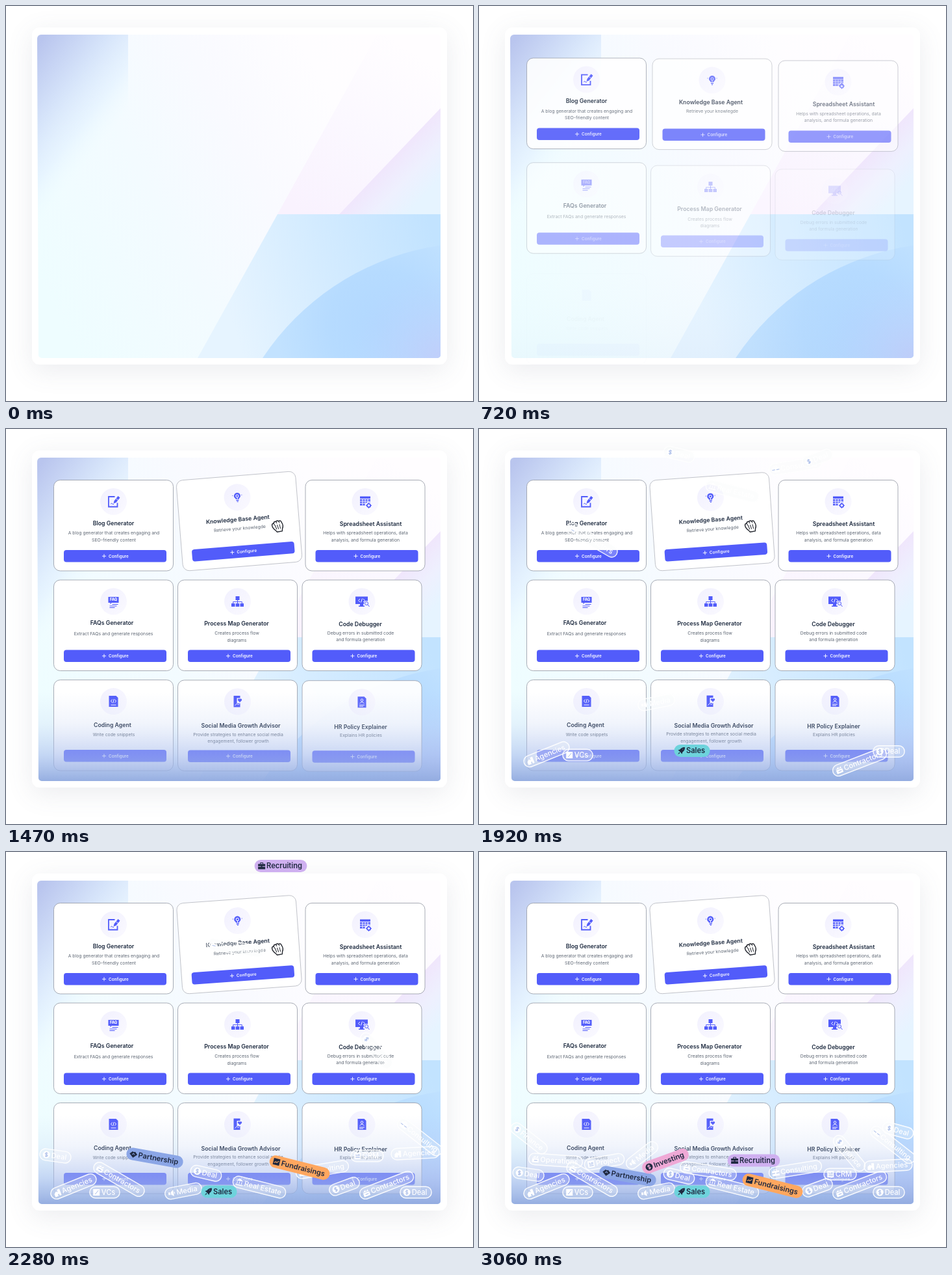
These frames come from a looping animation (719x607 px, 3.3 s). An HTML page with a canvas:

```html
<!DOCTYPE html>
<html lang="en">
<head>
<meta charset="utf-8">
<title>Agent gallery</title>
<style>
html, body { margin: 0; width: 100%; height: 100%; overflow: hidden; background: #fff; }
canvas { display: block; width: 719px; height: 607px; }
</style>
</head>
<body>
<canvas id="stage"></canvas>
<script>
const W = 719, H = 607, LOOP = 3300, STEP = 30;
const BLUE = '#525cfa', INK = '#1d2a3f', GREY = '#5c6572';
const FONT = 'Inter, "Open Sans", sans-serif';
const canvas = document.getElementById('stage');
const g = canvas.getContext('2d');
const dpr = window.devicePixelRatio || 1;
canvas.width = W * dpr;
canvas.height = H * dpr;

const clamp = v => Math.max(0, Math.min(1, v));
const rad = deg => deg * Math.PI / 180;

// Icon layers: f fill, s stroke, t thin stroke, F and T the same in the knock-out colour.
const ICONS = {
  edit: ['s M2 -7.5H-7.5V8H6V2', 'f M0 3L1 -1L7 -8.5L10 -6L4 1.5Z', 'T M4 -4.5L7 -2', 't M-4.500 4q2 -3 3 0h2'],
  bulb: ['f M-5 -2a5 5 0 1 1 10 0c0 3 -2.500 3 -2.500 5h-5c0 -2 -2.500 -2 -2.500 -5z', 'f M-2 4h4v1.500h-4zM-1 6.200h2v1.200h-2z',
    'T M-2 -2a2 2 0 1 1 4 0a2 2 0 1 1 -4 0M0 0v3', 't M-7.500 -3h1M6.500 -3h1'],
  table: ['f M-8 -8H8V6H-8Z', 'T M-8 -4H8M-8 -.5H8M-8 2.700H8M-4 -4V6M0 -4V6M4 -4V6', 'F M0 6a5.500 5.500 0 1 1 11 0a5.500 5.500 0 1 1 -11 0',
    's M2.800 6a2.700 2.700 0 1 1 5.400 0a2.700 2.700 0 1 1 -5.400 0', 't M5.500 1.500v1.500M5.500 9v1.500M1 6h1.500M8.500 6h1.500'],
  faq: ['f M-8 -7H8V2H-3L-5 4.500V2H-8Z', 't M-2 4.500H7M-6 7H5M-6 9.500H2'],
  tree: ['f M-3 -8H3V-2H-3ZM-9.500 3H-4V8H-9.500ZM-2.800 3H2.800V8H-2.800ZM4 3H9.500V8H4Z', 't M0 -2V3M-6.800 3V.5H6.800V3'],
  screen: ['f M-10 -7.500H9V4H-10ZM-3 4H2V6.500H-3ZM-5 6.500H4V8H-5Z', 'T M-3 -4L-5.500 -1.500L-3 1M2 -4L4.500 -1.500L2 1M.5 -4.500L-1.500 1.500',
    'F M3 3a4 4 0 1 1 8 0a4 4 0 1 1 -8 0', 't M4.500 3a2.500 2.500 0 1 1 5 0a2.500 2.500 0 1 1 -5 0M9 5L11.500 8'],
  code: ['f M-7 -8.500H4L7 -5.500V8.500H-7Z', 'T M-2 -3L-4 -.5L-2 2M2 -3L4 -.5L2 2M.6 -3.500L-.6 2.500M-4 5.500H4'],
  phone: ['f M-6 -9H4V8.500H-6Z', 'F M-1 -5.500H7V2.500H-1Z', 'f M3.500 1L.5 -2a1.600 1.600 0 0 1 3 -1.600a1.600 1.600 0 0 1 3 1.600Z', 'T M-4 6L-1 3L1 5L3 3'],
  person: ['f M-6.500 -8.500H3.500L6.500 -5.500V8.500H-6.500Z', 'T M-1.800 -3a1.800 1.800 0 1 1 3.600 0a1.800 1.800 0 1 1 -3.600 0M-3.500 2q3.500 -4 7 0M-4 4.500H4M-4 6.500H2'],
  coin: ['f M-5.500 0a5.500 5.500 0 1 1 11 0a5.500 5.500 0 1 1 -11 0', 'T M2 -2Q-2 -3.500 -2 -1.200Q-1.500 0 0 0Q2 .3 2 1.500Q1 3.200 -2 2M0 -4V4'],
  homes: ['f M-5 5V0L-1.500 -3L1 -1V-5H5V5H2V2H0V5Z'],
  slash: ['f M-5 -5H5V5H-5Z', 'T M-2 3L3 -3'],
  tool: ['f M-5 -1H5V5H-5ZM-5 -2L0 -5V-2L4 -5V-2Z', 'T M-2 2H3'],
  horn: ['f M-5 -2H-2V2H-5ZM-1 -2L3 -5V5L-1 2Z', 't M4.500 -1.500V1.500'],
  bank: ['f M-5.500 -2L0 -5.500L5.500 -2ZM-5.500 3.500H5.500V5H-5.500Z', 't M-3.500 -1V3M0 -1V3M3.500 -1V3'],
  gem: ['f M-6 0L-2 -4L0 -3L2 -4L6 0L0 5.500Z', 'T M-2 1L0 -1L2 1'],
  rocket: ['f M5.500 -5.500Q6 -1 2 2L1 5L-1 2.500L-2.500 1L-5 -1L-2 -2Q1 -6 5.500 -5.500ZM-3 2L-5.500 5.500L-2 3.500Z', 'T M2 -2.500h.8'],
  bag: ['f M-5.500 -3H5.500V5H-5.500Z', 't M-2 -3V-4.800H2V-3', 'T M-5.500 .8H-1M1 .8H5.500'],
  chart: ['f M-5 -5H5V5H-5Z', 'T M-3.500 2L-1 0L.5 1L3.500 -2'],
  list: ['f M-5 -5H5V5H-5Z', 'T M-3 -2H-1.500M0 -2H3.500M-3 0H3.500M-3 2.500H3.500']
};
for (const k in ICONS) ICONS[k] = ICONS[k].map(s => [s[0], new Path2D(s.slice(2))]);

function icon(name, x, y, color, cut) {
  g.save();
  g.translate(x, y);
  for (const [mode, path] of ICONS[name]) {
    g.fillStyle = g.strokeStyle = 'FT'.includes(mode) ? cut : color;
    g.lineWidth = mode === 's' ? 1.8 : 1;
    if ('fF'.includes(mode)) g.fill(path); else g.stroke(path);
  }
  g.restore();
}

function text(s, x, y, size, weight, color, align = 'center') {
  g.font = `${weight} ${size}px ${FONT}`;
  g.textAlign = align;
  g.fillStyle = color;
  g.fillText(s, x, y + size * 0.35);
}

function box(x, y, w, h, r) {
  g.beginPath();
  g.roundRect(x, y, w, h, r);
}

function poly(pts) {
  g.beginPath();
  pts.forEach(([x, y]) => g.lineTo(x, y));
  g.closePath();
}

function stops(grad, list) {
  list.forEach(([at, c]) => grad.addColorStop(at, c));
  g.fillStyle = grad;
}
const linear = (x0, y0, x1, y1, ...list) => stops(g.createLinearGradient(x0, y0, x1, y1), list);
const radial = (x, y, r, ...list) => stops(g.createRadialGradient(x, y, 0, x, y, r), list);

function innerPath() {
  g.beginPath();
  g.moveTo(54, 44);
  g.arcTo(669, 44, 669, 541, 5);
  g.arcTo(669, 541, 50, 541, 5);
  g.arcTo(50, 541, 48, 44, 5);
  g.arcTo(48, 44, 669, 44, 6);
  g.closePath();
}

function backdrop() {
  g.fillStyle = '#fff';
  g.fillRect(0, 0, W, H);
  g.save();
  g.shadowColor = 'rgba(90,95,120,.12)';
  g.shadowBlur = 40 * dpr;
  g.shadowOffsetY = 9 * dpr;
  box(40, 33, 639, 518, 11);
  g.fill();
  g.restore();

  g.save();
  innerPath();
  g.clip();
  linear(48, 420, 600, 130, [0, '#eefdff'], [.35, '#f3fbff'], [.6, '#f9faff'], [.85, '#fefdff'], [1, '#fffdff']);
  g.fillRect(48, 44, 621, 497);
  linear(48, 60, 184, 166, [0, '#b9c5ee'], [.45, '#d6e4fa'], [.75, 'rgba(228,242,255,.75)'], [1, 'rgba(238,252,255,0)']);
  g.fillRect(48, 44, 140, 497);
  linear(450, 310, 610, 60, [0, '#f9f2fe'], [.5, '#fbf8ff'], [1, '#fffdff']);
  poly([[571, 44], [669, 44], [669, 157], [513, 320], [418, 320]]);
  g.fill();
  linear(590, 238, 645, 291, [0, '#f0e6fc'], [.5, '#eef0fe'], [1, '#e6f4ff']);
  poly([[669, 157], [669, 320], [513, 320]]);
  g.fill();
  linear(340, 460, 660, 360, [0, '#e6f4ff'], [.5, '#d3ebff'], [1, '#c2e3ff']);
  poly([[418, 320], [669, 320], [669, 541], [295, 541]]);
  g.fill();
  g.beginPath();
  g.arc(725, 760, 396, 0, 7);
  radial(580, 490, 165, [0, '#b2d8ff'], [.5, '#b6dbff'], [1, '#c2e2ff']);
  g.fill();
  radial(669, 541, 140, [0, 'rgba(193,205,250,.9)'], [1, 'rgba(185,214,255,0)']);
  g.fill();
  g.restore();
}

// x, y, icon, title, title centre, title y, text lines, text centre, text y
const CARDS = [
  [73.5, 78.5, 'edit', 'Blog Generator', 92, 66, ['A blog generator that creates engaging and', 'SEO-friendly content'], 92.5, 81.5],
  [267, 78, 'bulb', 'Knowledge Base Agent', 90, 67, ['Retrieve your knowlegde'], 92, 81],
  [461, 78.5, 'table', 'Spreadsheet Assistant', 100.5, 67, ['Helps with spreadsheet operations, data', 'analysis, and formula generation'], 92.5, 81.5],
  [73.5, 232, 'faq', 'FAQs Generator', 89.5, 66, ['Extract FAQs and generate responses'], 92, 82.5],
  [264.5, 232, 'tree', 'Process Map Generator', 90.5, 67, ['Creates process flow', 'diagrams'], 91, 82],
  [456, 232, 'screen', 'Code Debugger', 89.5, 67.5, ['Debug errors in submitted code', 'and formula generation'], 90, 81.5],
  [73.5, 385.5, 'code', 'Coding Agent', 90.5, 69, ['Write code snippets'], 92.5, 84],
  [264.5, 385.5, 'phone', 'Social Media Growth Advisor', 97, 70.5, ['Provide strategies to enhance social media', 'engagement, follower growth'], 93, 83.5],
  [456, 385.5, 'person', 'HR Policy Explainer', 90, 71, ['Explains HR policies'], 90.5, 84]
];

function card([x, y, pic, title, titleX, titleY, lines, lineX, lineY], t, i) {
  const age = t - 136 - i * 90;
  const alpha = clamp((age - 30) / 620);
  if (!alpha) return;
  g.save();
  g.globalAlpha = alpha;
  g.translate(x, y + 30 * (1 - clamp(age / 930)) ** 3);
  if (i === 1) {
    const s = Math.max(0, t - 1100);
    const k = s ? 1 - Math.exp(-s / 180) * Math.cos(s * Math.PI / 360) : 0;
    g.translate(92, 69.5 - 5.5 * k);
    g.rotate(rad(-4.1 * k));
    g.translate(-92, -69.5);
  }
  box(0, 0, 184, 139.5, 10);
  g.fillStyle = '#fff';
  g.fill();
  g.lineWidth = .8;
  g.strokeStyle = i === 1 ? '#b4b7be' : '#9297a3';
  g.stroke();

  linear(72, 13, 112, 53, [0, '#f2f1fe'], [1, '#faf9ff']);
  g.beginPath();
  g.arc(92, 33, 20.5, 0, 7);
  g.fill();
  icon(pic, 92, 33, BLUE, '#f8f7ff');
  if (pic === 'faq') text('FAQ', 92, 30.5, 5.6, 800, '#fff');

  text(title, titleX, titleY, 8.75, 600, INK);
  lines.forEach((s, n) => text(s, lineX, lineY + n * 10.5, 6.85, 400, GREY));
  box(15.5, 107.5, 158, 18.5, 4);
  g.fillStyle = BLUE;
  g.fill();
  g.strokeStyle = '#fff';
  g.lineWidth = .9;
  g.beginPath();
  g.moveTo(74.5, 116.8); g.lineTo(80.5, 116.8);
  g.moveTo(77.5, 113.8); g.lineTo(77.5, 119.8);
  g.stroke();
  text('Configure', 84.5, 116.8, 6.4, 600, '#fff', 'left');
  g.restore();
}

// label, icon, x, resting y, tilt, landing time, colour
const PILLS = [
  ['Finance', 'coin', 77, 440, 38, 2760],
  ['Operations', 'tool', 118, 474, 4, 2620],
  ['Deal', 'coin', 76, 495, 8, 2205],
  ['Agencies', 'homes', 104, 514, -22, 1792],
  ['VCs', 'slash', 152, 523, 0, 1810],
  ['Contractors', 'tool', 174, 503, 30, 2052],
  ['Project', 'list', 193, 476, -10, 2650],
  ['Media', 'horn', 251, 466, -38, 2700],
  ['Media', 'horn', 273, 521, -11, 1953],
  ['Deal', 'coin', 308, 498, 13, 2136],
  ['Contractors', 'tool', 353, 490, 9, 2422],
  ['Real Estate', 'bank', 390, 515, 14, 2097],
  ['Consulting', 'bag', 487, 488, -9, 2120],
  ['Deal', 'coin', 521, 516, -20, 2133],
  ['Contractors', 'tool', 586, 512, -21, 1770],
  ['Finance', 'coin', 570, 463, 50, 2340],
  ['CRM', 'list', 556, 495, 0, 2205],
  ['Deal', 'coin', 631, 523, 0, 1835],
  ['Agencies', 'homes', 630, 482, -3, 2247],
  ['Consulting', 'bag', 637, 450, 38, 2262],
  ['Deal', 'coin', 645, 428, 15, 2730],
  ['Partnership', 'gem', 229, 498, 10, 2205, '#8ba6e6'],
  ['Sales', 'rocket', 328, 522, 0, 1835, '#6ed3dc'],
  ['Fundraisings', 'chart', 452, 513, 14, 2205, '#ffa75f'],
  ['Investing', 'coin', 287, 475, -20, 2680, '#efa9d6'],
  ['Recruiting', 'bag', 423, 474, 0, 2509, '#cfb0f0']
];
const FALL = 350, BOUNCE = 150, TOP = -40;

function dropY(t, rest, land) {
  if (t < land) return TOP + (rest - TOP) * (1 - (land - t) / FALL) ** 2;
  const u = clamp((t - land) / BOUNCE);
  return rest - 112 * u * (1 - u);
}

function pill([label, pic, x, rest, tilt, land, color], t) {
  if (t < land - FALL) return;
  const weight = color ? 600 : 500;
  g.font = `${weight} 11.1px ${FONT}`;
  const w = g.measureText(label).width + 26;
  g.save();
  g.translate(x, dropY(t, rest, land));
  g.rotate(rad(tilt));
  box(-w / 2, -9.5, w, 19, 9.5);
  g.fillStyle = color || 'rgba(244,245,248,.25)';
  g.fill();
  if (!color) {
    box(-w / 2 + .7, -8.8, w - 1.4, 17.6, 8.8);
    g.lineWidth = 1.4;
    g.strokeStyle = 'rgba(255,255,255,.9)';
    g.stroke();
  }
  const ink = color ? '#1f2940' : '#fff';
  icon(pic, -w / 2 + 11, 0, ink, color || '#a9bce8');
  text(label, -w / 2 + 18.5, 0, 11.1, weight, ink, 'left');
  g.restore();
}

const HAND = new Path2D('M-8 -3q0 -3 3 -3q1 -3 4 -2q2 -2 4 0q4 -1 4 2q3 6 0 10l-1 4h-8l-2 -3q-4 -4 -4 -8z');
const KNUCKLES = new Path2D('M-3 -2l1 6M0 -3l1 7M3.500 -3l.5 7M-5 -6l2 5M-1 -8l1 3M3 -8l1 3');

function hand(t) {
  g.save();
  g.globalAlpha = clamp((t - 1200) / 180);
  g.translate(418, 150);
  g.rotate(rad(-10));
  g.fillStyle = '#fff';
  g.strokeStyle = '#22252d';
  g.lineWidth = 1.4;
  g.lineJoin = 'round';
  g.fill(HAND);
  g.stroke(HAND);
  g.lineWidth = 1;
  g.stroke(KNUCKLES);
  g.restore();
}

function haze(t) {
  g.save();
  g.globalAlpha = clamp((t - 690) / 500);
  innerPath();
  linear(0, 405, 0, 541, [0, 'rgba(190,205,242,0)'], [.35, 'rgba(184,202,240,.2)'], [.7, 'rgba(165,186,236,.57)'], [1, 'rgba(145,170,223,.95)']);
  g.fill();
  g.restore();
}

function draw(t) {
  g.setTransform(dpr, 0, 0, dpr, 0, 0);
  backdrop();
  if (t < 240) return;
  CARDS.forEach((c, i) => { if (i !== 1) card(c, t, i); });
  card(CARDS[1], t, 1);
  haze(t);
  hand(t);
  g.save();
  g.beginPath();
  g.rect(49, 0, 620, H);
  g.clip();
  PILLS.forEach(p => pill(p, t));
  g.restore();
}

const start = performance.now();
function tick() {
  const t = (performance.now() - start) % LOOP;
  draw(Math.floor(t / STEP) * STEP);
  requestAnimationFrame(tick);
}
tick();
</script>
</body>
</html>
```
